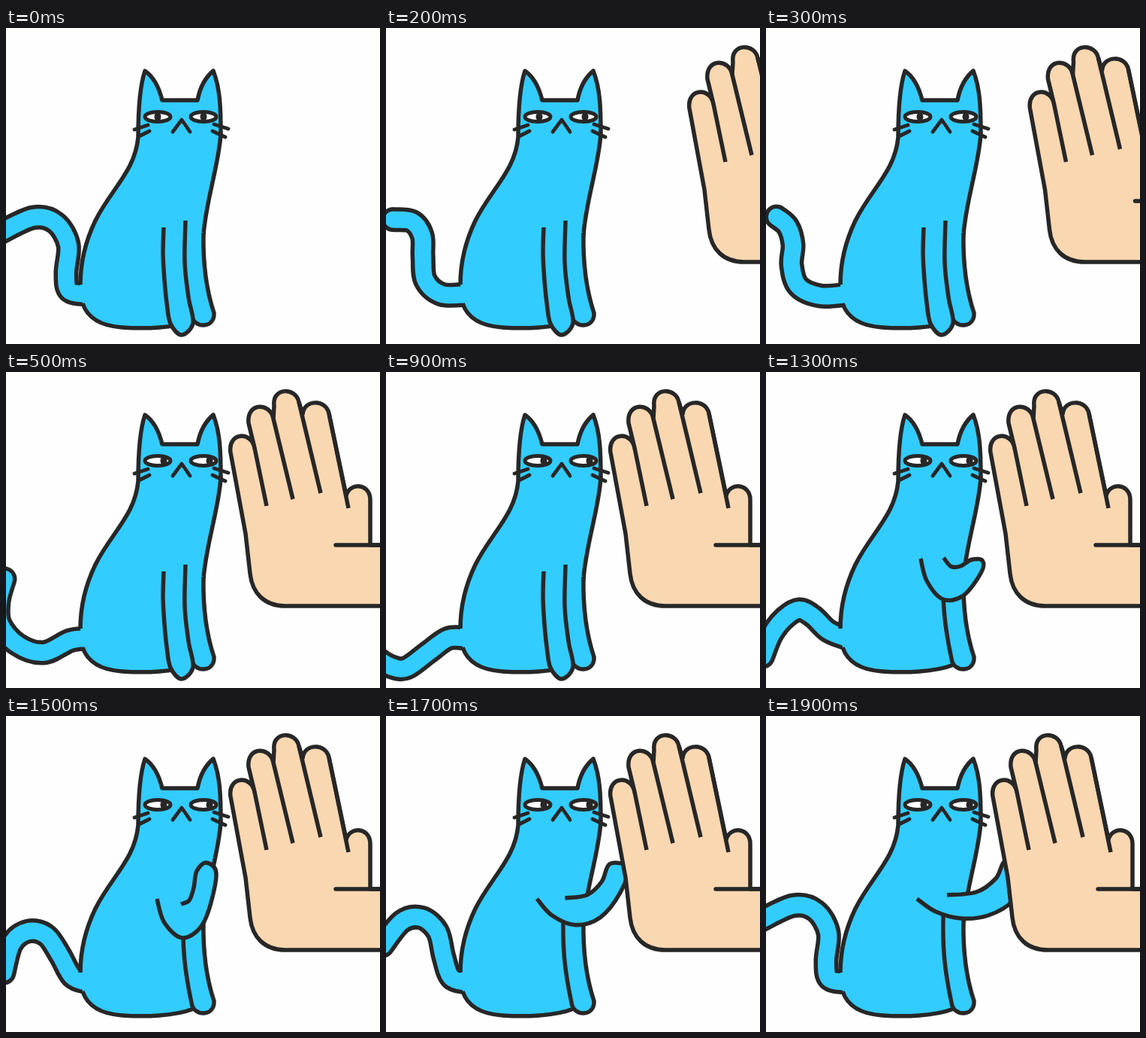
An HTML page with a canvas for the animation above (2 s loop, 498 px wide and 420 px high).

```html
<!DOCTYPE html>
<html lang="en">
<head>
<meta charset="utf-8">
<title>Cat high five</title>
<style>
  html, body { margin: 0; width: 100%; height: 100%; overflow: hidden; background: #fdfefd; }
  canvas { display: block; }
</style>
</head>
<body>
<canvas id="stage" width="498" height="420"></canvas>
<script>
const ctx = document.getElementById('stage').getContext('2d');
const LOOP = 2000, STEP = 100;
const INK = '#272727', BLUE = '#33ccff', SKIN = '#f9d7b1', PAPER = '#fdfefd';
const LINE = 5.5;

// Tail centre line, base to tip: [time, x, y, x, y, ...]
const tailKeys = [
  [0, 108,354, 84,349, 80,325, 83,288, 66,259, 36,252, -8,272],
  [300, 108,354, 72,356, 43,343, 34,315, 36,288, 29,264, 14,251],
  [500, 108,354, 85,357, 50,373, 15,362, -8,335, -10,305, -2,275],
  [900, 108,354, 83,354, 57,372, 28,393, 8,392, -12,380, -30,360],
  [1100, 108,354, 78,344, 54,339, 36,349, 22,371, 8,390, -10,402],
  [1500, 108,354, 88,346, 72,318, 54,292, 30,286, 8,302, -3,341],
];
tailKeys.push([1900, ...tailKeys[0].slice(1)], [LOOP, ...tailKeys[0].slice(1)]);

// Outline of the moving front leg, from one shoulder side round the paw to the other
const legDown = [210,265, 209,300, 211,335, 214,365, 219,393, 234,408, 249,392, 243,358, 238,312, 239,256];
const legLow = [211,253, 217,280, 235,309, 262,321, 293,321, 309,306, 293,293, 268,288, 249,272, 240,244];
const legUp = [201,243, 211,275, 236,295, 264,273, 280,212, 267,195, 254,206, 250,228, 244,245, 233,250];
const legPush = [201,243, 226,260, 260,269, 296,265, 328,246, 350,205, 320,192, 306,216, 280,234, 241,238];
const legKeys = [
  [0, ...legDown], [900, ...legDown], [1100, ...legLow],
  [1500, ...legUp], [1800, ...legPush], [LOOP, ...legPush],
];

const handKeys = [[0, 210], [400, 0], [1700, 0], [1900, 3], [LOOP, 3]];
const pupilKeys = [[0, 0], [300, 3], [500, 8], [LOOP, 8]];

const cat = {
  fill: new Path2D(`M99,341 C99,315 105,285 119,256 C140,214 172,190 176,145 C176,110 179,75 185,57
    Q201,68 208,96 H255 Q260,70 276,57 C285,80 286,105 286,140 C284,180 266,230 263,275
    L264,380 L250,389 C225,399 185,400 155,398 C125,396 108,384 102,366 Z`),
  line: new Path2D(`M99,341 C99,315 105,285 119,256 C140,214 172,190 176,145 C176,110 179,75 185,57
    Q201,68 208,96 H255 Q260,70 276,57 C285,80 286,105 286,140 C284,180 266,230 263,275
    M102,366 C108,384 125,396 155,398 S225,399 250,389`),
  face: new Path2D(`M222,138 L234,122 L245,138 M171,135 L189,129 M177,144 L191,137
    M277,128 L296,134 M275,137 L292,145`),
};
const hand = {
  shape: new Path2D(`M530,311 H372 C345,311 328,295 325,268 L319,215 L299,107
    C295,80 327,78 331,101 L323,68 C320,40 352,40 356,62 L357,45 C354,20 386,20 390,40
    L395,56 C397,36 426,36 430,55 L453,164 C458,146 485,148 485,170 V230 H530`),
  fingers: new Path2D('M331,101 L347,178 M356,62 L382,169 M390,40 L419,161 M430,55 L456,181'),
  wrist: new Path2D('M439,230 H530'),
};

// Value of a keyed list at time t, linear or as a smooth curve through the keys
function at(keys, t, smooth) {
  let i = 0;
  while (i < keys.length - 2 && t >= keys[i + 1][0]) i++;
  const a = keys[i], b = keys[i + 1], span = b[0] - a[0];
  const u = (t - a[0]) / span;
  const slope = (k, n) => {
    const p = keys[Math.max(k - 1, 0)], q = keys[Math.min(k + 1, keys.length - 1)];
    return (q[n] - p[n]) / (q[0] - p[0]) * span;
  };
  return a.slice(1).map((v, k) => {
    const n = k + 1, d = b[n] - v;
    if (!smooth) return v + d * u;
    const m0 = slope(i, n), m1 = slope(i + 1, n);
    return v + u * (m0 + u * (3 * d - 2 * m0 - m1 + u * (m0 + m1 - 2 * d)));
  });
}

// Smooth curve through a flat list of points
function curve(c) {
  const path = new Path2D(), last = c.length / 2 - 1;
  const pt = i => {
    const k = 2 * Math.min(Math.max(i, 0), last);
    return [c[k], c[k + 1]];
  };
  path.moveTo(...pt(0));
  for (let i = 0; i < last; i++) {
    const [p, a, b, q] = [pt(i - 1), pt(i), pt(i + 1), pt(i + 2)];
    path.bezierCurveTo(
      a[0] + (b[0] - p[0]) / 6, a[1] + (b[1] - p[1]) / 6,
      b[0] - (q[0] - a[0]) / 6, b[1] - (q[1] - a[1]) / 6, ...b);
  }
  return path;
}

function fill(path, color) {
  ctx.fillStyle = color;
  ctx.fill(path);
}

function stroke(path, color = INK, width = LINE, cap = 'butt') {
  ctx.strokeStyle = color;
  ctx.lineWidth = width;
  ctx.lineCap = cap;
  ctx.stroke(path);
}

function tube(points, width) {
  const path = curve(points);
  stroke(path, INK, width + LINE, 'round');
  stroke(path, BLUE, width - LINE, 'round');
}

function eye(x, look) {
  const ball = new Path2D(), pupil = new Path2D();
  ball.ellipse(x, 118, 17, 6.5, 0, 0, 7);
  pupil.ellipse(x + look, 118, 4.5, 5.5, 0, 0, 7);
  fill(ball, '#fff');
  fill(pupil, INK);
  stroke(ball, INK, 5);
}

function backLeg() {
  const leg = new Path2D(`M236,262 C235,305 237,335 247,381 C249,400 278,400 277,379
    C268,352 262,315 263,272`);
  fill(leg, BLUE);
  stroke(leg);
}

function drawHand(offset) {
  ctx.save();
  ctx.translate(offset, 0);
  fill(hand.shape, SKIN);
  stroke(hand.shape);
  stroke(hand.fingers);
  stroke(hand.wrist, INK, LINE, 'round');
  ctx.restore();
}

function draw(t) {
  ctx.lineJoin = 'round';
  ctx.fillStyle = PAPER;
  ctx.fillRect(0, 0, 498, 420);

  tube(at(tailKeys, t, true), 27.5);
  fill(cat.fill, BLUE);
  stroke(cat.line);

  const [look] = at(pupilKeys, t);
  eye(202, look);
  eye(263, look);
  stroke(cat.face, INK, 4.8, 'round');

  backLeg();
  const leg = curve(at(legKeys, t));
  fill(leg, BLUE);
  stroke(leg);

  drawHand(at(handKeys, t)[0]);
}

function tick() {
  draw(Math.floor(performance.now() / STEP) * STEP % LOOP);
  requestAnimationFrame(tick);
}
tick();
</script>
</body>
</html>
```
